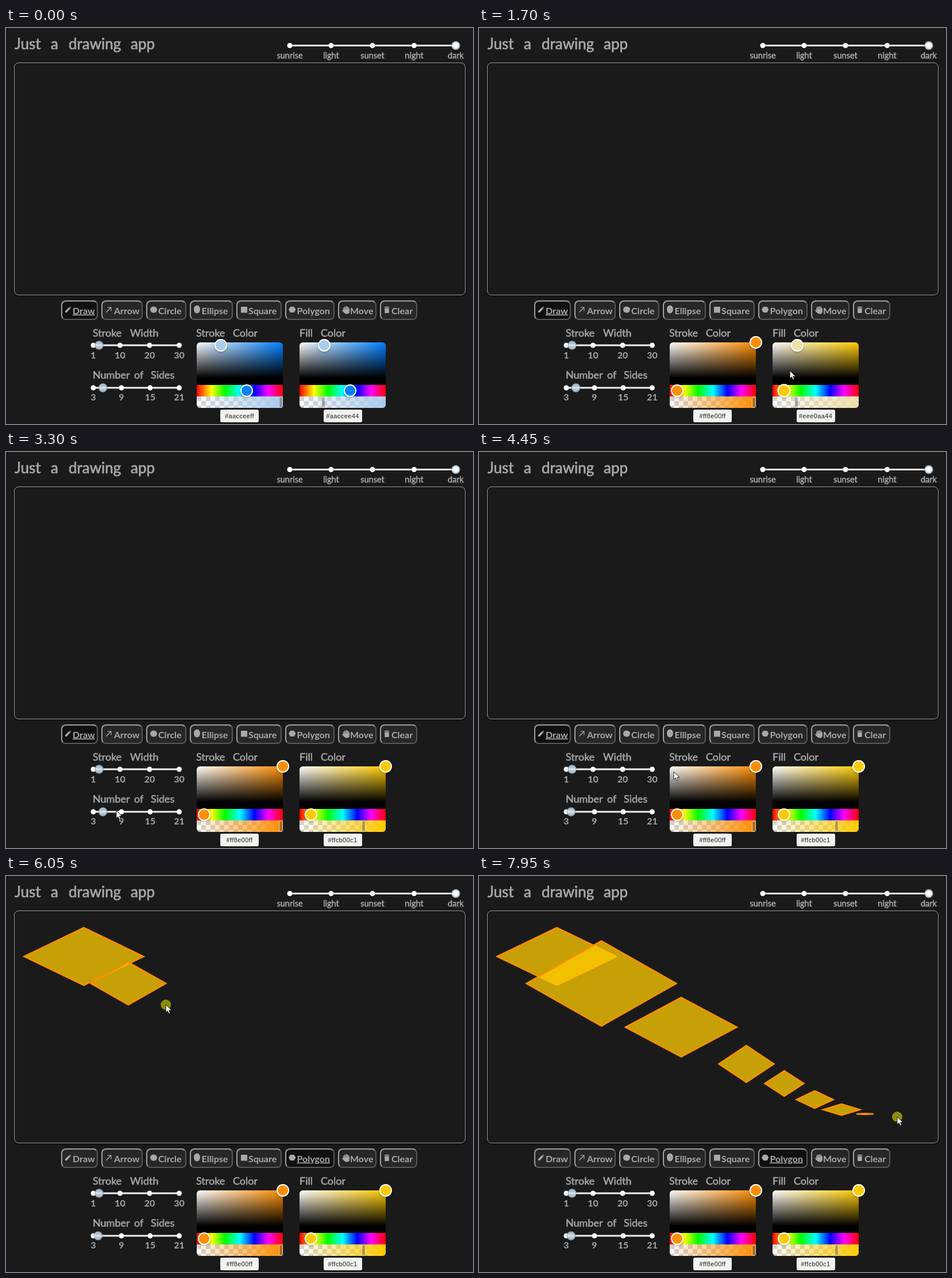
Animation of 813 by 689 pixels, one loop 8000 ms. Source, as an HTML page:

```html
<!DOCTYPE html>
<html lang="en">
<head>
<meta charset="utf-8">
<title>Just a drawing app</title>
<style>
  html, body { margin: 0; width: 100%; height: 100%; overflow: hidden; background: #1a1a1a; }
  #stage { position: relative; width: 813px; height: 689px; overflow: hidden; }
  #stage div, svg { position: absolute; box-sizing: border-box; }
  svg { left: 0; top: 0; width: 813px; height: 689px; }
  text { font-family: Lato, "Open Sans", sans-serif; fill: #a8a8a8; stroke: #a8a8a8; stroke-width: .5px; }
  .title { font-size: 26px; stroke-width: .7px; }
  .head { font-size: 18px; }
  .num, .btn { font-size: 16px; font-weight: bold; stroke-width: 0; }
  .theme { font-size: 14.5px; }
  .paper { left: 14px; top: 60px; width: 786px; height: 405px; border: 1px solid #999;
    border-radius: 8px; box-shadow: 0 1px 4px #0009; }
  .tool { top: 474px; height: 34px; border: 2px solid; border-color: #a0a0a0 #585858 #585858 #a0a0a0;
    border-radius: 8px; background: #272727; }
  .tool.on { background: #101010; }
  .picker { top: 547px; width: 150px; height: 114px; }
  .sat { width: 150px; height: 74px; border-bottom: 12px solid #000; border-radius: 6px 6px 0 0;
    background-image: linear-gradient(0deg, #000, transparent), linear-gradient(90deg, #fff, transparent); }
  .hue { top: 74px; width: 150px; height: 20px;
    background: linear-gradient(90deg, #f00, #ff0 17%, #0f0 33%, #0ff 50%, #00f 67%, #f0f 83%, #f00); }
  .alpha { top: 94px; width: 150px; height: 20px; border-radius: 0 0 6px 6px; overflow: hidden;
    background: repeating-conic-gradient(#fff 0 25%, #d4d4d4 0 50%) 0 0 / 16px 16px; }
  .fade { width: 150px; height: 20px; }
  .dot { width: 22px; height: 22px; margin: -11px; border: 2px solid #fff; border-radius: 50%;
    box-shadow: 0 2px 4px #0003; }
  .grip { top: 94px; width: 7px; height: 20px; margin-left: -3.5px; border: 1.5px solid #ffffffc0;
    border-radius: 3px; background: #0004; box-shadow: 0 0 1px #0009; }
  .hex { left: 41.5px; top: 117px; width: 67px; height: 22px; border-radius: 3px; background: #f2f2f0;
    color: #222; font: 11px/22px "Liberation Sans", Arial, sans-serif; letter-spacing: .4px; text-align: center; }
</style>
</head>
<body>
<div id="stage">
  <div class="paper"></div>
  <div id="tools"></div>
  <svg id="ui"></svg>
  <div id="pickers"></div>
  <svg id="top">
    <g id="shapes" fill="#ffcb00c1" stroke="#ff8e00" stroke-width="2.5" stroke-miterlimit="10"></g>
    <circle id="press" r="9" fill="#ff0" fill-opacity=".5"/>
    <path id="arrow" d="M0 0V13.5L3.2 10.6L5.3 15.4L7.6 14.4L5.5 9.8H10Z" fill="#fff" stroke="#111" stroke-width=".9"/>
    <path id="beam" d="M-3 -6.5Q0 -6.5 0 -5Q0 -6.5 3 -6.5M0 -5V5M-3 6.5Q0 6.5 0 5Q0 6.5 3 6.5" fill="none" stroke="#ddd"/>
  </svg>
</div>
<script>
const $ = id => document.getElementById(id);
const NS = 'http://www.w3.org/2000/svg';
const clamp = v => Math.min(1, Math.max(0, v));

function svg(parent, tag, attrs, label) {
  const el = document.createElementNS(NS, tag);
  for (const k in attrs) el.setAttribute(k, attrs[k]);
  if (label) el.textContent = label;
  return parent.appendChild(el);
}
function div(parent, cls) {
  const el = document.createElement('div');
  el.className = cls;
  return parent.appendChild(el);
}
const ui = $('ui');
const write = (cls, y, anchor, pairs) => pairs.forEach(([x, s]) =>
  svg(ui, 'text', { x, y, class: cls, 'text-anchor': anchor }, s));

// Labels
write('title', 37, 'start', [[15, 'Just'], [78, 'a'], [109, 'drawing'], [217, 'app']]);
write('head', 537, 'start', [[151, 'Stroke'], [216, 'Width'], [331, 'Stroke'], [395, 'Color'], [511, 'Fill'], [548, 'Color']]);
write('head', 610, 'start', [[151, 'Number'], [223, 'of'], [252, 'Sides']]);

// Sliders
function slider(y, stops, r, thumb) {
  svg(ui, 'path', { d: `M${stops[0]} ${y}H${stops[stops.length - 1]}`, stroke: '#efeeee', 'stroke-width': 3 });
  stops.forEach(cx => svg(ui, 'circle', { cx, cy: y, r, fill: '#fff' }));
  return svg(ui, 'circle', { cx: thumb, cy: y, r: 7, fill: '#d5dfe9', 'fill-opacity': .85, stroke: '#86a3bd', 'stroke-width': 1.3 });
}
const themes = [494, 566, 638, 710.5, 783], widths = [152, 198.5, 250, 301.5], counts = [152, 201, 251, 301.5];
slider(30.5, themes, 4.5, 783).setAttribute('fill', '#fff');
slider(552, widths, 4.5, 162);
const sides = slider(626, counts, 4.5, 168.5);
write('theme', 53, 'middle', ['sunrise', 'light', 'sunset', 'night', 'dark'].map((s, i) => [themes[i], s]));
write('num', 575, 'middle', [1, 10, 20, 30].map((s, i) => [widths[i], s]));
write('num', 648, 'middle', [3, 9, 15, 21].map((s, i) => [counts[i], s]));

// Tool buttons: left, right, text x, label, icon path
const pencil = 'M103 495V492.5L109.5 486L112 488.5L105.5 495ZM110.3 485.3L111.2 484.5L113.5 486.8L112.7 487.7Z';
const hand = 'M587 490V486.5H588.8V490H589.3V485H591.2V489.5H591.7V484H593.6V489.5H594.1V485H596V490H596.4V487H598V493Q597.5 497.5 593.5 497.5Q590 497.5 588.5 495.5L584.8 491.5Q585.5 490 587.5 491.5Z';
const tools = [
  [96, 160, 116, 'Draw', pencil],
  [166, 238, 188, 'Arrow', 'M174 494.2L181.4 486.8H177V485.6H183.6V492.2H182.4V487.8L174.9 495.2Z'],
  [244, 314, 265, 'Circle', 'M251 490A6 5.5 0 0 1 263 490A6 5.5 0 0 1 251 490Z'],
  [320, 395, 340.5, 'Ellipse', 'M327 489.5A5.5 7 0 0 1 338 489.5A5.5 7 0 0 1 327 489.5Z'],
  [401, 480, 422, 'Square', 'M409 485H420V495.5H409Z'],
  [486, 572, 506.5, 'Polygon', 'M492 490L495 485H501.5L504.5 490L501.5 495H495Z'],
  [578, 645, 599, 'Move', hand],
  [651, 716, 671, 'Clear', 'M658.5 485.2H661L661.6 484.5H664.4L665 485.2H667.5V486.6H658.5ZM659.2 487.4H666.8V495Q666.8 496 665.8 496H660.2Q659.2 496 659.2 495Z']
].map(([l, r, x, label, d]) => {
  const box = div($('tools'), 'tool');
  box.style.left = l + 'px';
  box.style.width = r - l + 'px';
  svg(ui, 'path', { d, fill: '#a8a8a8' });
  return { box, text: svg(ui, 'text', { x, y: 497.5, class: 'btn' }, label) };
});

// Colour pickers
function picker(left, alpha) {
  const root = div($('pickers'), 'picker'), p = { left, alpha };
  root.style.left = left + 'px';
  p.sat = div(root, 'sat');
  div(root, 'hue');
  p.fade = div(div(root, 'alpha'), 'fade');
  p.grip = div(root, 'grip');
  p.hueDot = div(root, 'dot');
  p.hueDot.style.top = '84px';
  p.satDot = div(root, 'dot');
  p.hex = div(root, 'hex');
  return p;
}
const line = picker(331.5, 1), fill = picker(511, 68 / 255);

function rgb(h, s, v) {
  return [5, 3, 1].map(n => {
    const k = (n + h * 6) % 6;
    return Math.round(255 * v * (1 - s * clamp(Math.min(k, 4 - k))));
  });
}
const hex2 = n => n.toString(16).padStart(2, '0');

function paint(p, c, focus) {
  const col = rgb(c.h, c.s, c.v), pure = `rgb(${rgb(c.h, 1, 1)})`;
  p.sat.style.backgroundColor = p.hueDot.style.backgroundColor = pure;
  p.satDot.style.backgroundColor = `rgb(${col})`;
  p.satDot.style.left = c.s * 150 + 'px';
  p.satDot.style.top = (1 - c.v) * 74 + 'px';
  p.hueDot.style.left = c.h * 150 + 'px';
  p.grip.style.left = 3.5 + c.a * 143 + 'px';
  p.fade.style.background = `linear-gradient(90deg, rgba(${col},0), rgb(${col}))`;
  p.satDot.style.transform = focus === 'sat' ? 'scale(1.06)' : '';
  p.hueDot.style.transform = focus === 'hue' ? 'scale(1.06)' : '';
  p.hex.textContent = '#' + [...col, Math.round(c.a * 255)].map(hex2).join('');
}

// Pointer path: time, x, y
const path = [
  [0, 428, 702], [200, 419, 631], [420, 345.42, 631], [560, 375, 553], [740, 484, 545], [950, 516, 530],
  [1150, 598, 631], [1450, 530.9, 631], [1620, 530.9, 631], [1800, 554, 553], [2000, 672, 545],
  [2250, 580, 633], [2450, 551, 651], [2500, 551, 651], [2750, 624.53, 651], [2850, 622, 651],
  [3300, 192, 624], [3450, 169, 620], [3600, 169, 620], [4000, 160, 619], [4120, 160, 619],
  [4800, 529, 490], [4950, 529, 488], [5350, 135.5, 140], [5400, 135.5, 140], [5450, 148.5, 151],
  [5700, 239.5, 190], [5780, 239.5, 190], [5900, 213, 187], [6200, 343.5, 261], [6300, 352, 263],
  [6550, 449, 314.5], [6650, 465.5, 327], [6700, 473, 331.3], [6850, 513.5, 359], [6950, 531.5, 361],
  [7050, 565.5, 383], [7150, 584.5, 389], [7250, 616.5, 404], [7350, 631, 406.5], [7450, 663, 416.2],
  [7500, 663, 416.2], [7600, 672, 414], [7700, 687, 414.7], [7900, 728, 419], [8000, 728, 419]
];
function at(t) {
  let i = 1;
  while (path[i][0] < t) i++;
  const [t0, x0, y0] = path[i - 1], [t1, x1, y1] = path[i], k = (t - t0) / (t1 - t0);
  return [x0 + (x1 - x0) * k, y0 + (y1 - y0) * k];
}

// Presses: start, end, kind, picker
const presses = [
  [200, 420, 'hue', line], [560, 740, 'sat', line],
  [1150, 1450, 'hue', fill], [1800, 2000, 'sat', fill], [2500, 2750, 'alpha', fill],
  [3600, 3950, 'sides'], [4800, 4850, 'tool'],
  ...[[5400, 5700], [5900, 6200], [6300, 6550], [6650, 6850], [6950, 7050], [7150, 7250], [7350, 7450], [7600, 7700]]
    .map(([a, b]) => [a, b, 'shape']),
  [7900, 8000, 'none']
];
const diamonds = presses.filter(p => p[2] === 'shape').map(p => [p, svg($('shapes'), 'path', {})]);

function draw(t) {
  const start = a => ({ h: 210 / 360, s: 68 / 238, v: 238 / 255, a });
  const colors = new Map([[line, start(line.alpha)], [fill, start(fill.alpha)]]);
  let focus = [], n = 5, polygon = false, down = false;
  for (const [from, to, kind, who] of presses) {
    if (t < from) break;
    const [x, y] = at(Math.min(t, to)), c = colors.get(who);
    const u = c && clamp((x - who.left) / 150);
    if (kind === 'hue') c.h = u;
    if (kind === 'sat') { c.s = u; c.v = clamp(1 - (y - 547) / 74); }
    if (kind === 'alpha') c.a = u;
    if (kind === 'sides') n = 3 + Math.round((x - 152) / 150 * 18);
    if (kind === 'tool') polygon = true;
    focus = [who, kind];
    down = t <= to;
  }
  for (const [p, c] of colors) paint(p, c, focus[0] === p && focus[1]);
  sides.setAttribute('cx', 152 + (n - 3) / 18 * 150);
  tools.forEach((tool, i) => {
    const on = i === (polygon ? 5 : 0);
    tool.box.classList.toggle('on', on);
    tool.text.style.textDecoration = on ? 'underline' : 'none';
  });
  for (const [[from, to], el] of diamonds) {
    const [cx, cy] = at(from), [x, y] = at(Math.max(from, Math.min(t, to)));
    const rx = x - cx, ry = y - cy;
    el.setAttribute('d', t > from ? `M${cx + rx} ${cy}L${cx} ${cy + ry}L${cx - rx} ${cy}L${cx} ${cy - ry}Z` : '');
  }
  const [x, y] = at(t), overText = x > 511 && x < 590 && y > 522 && y < 540 && t < 1100;
  for (const id of ['press', 'arrow', 'beam']) $(id).setAttribute('transform', `translate(${x} ${y})`);
  $('press').style.display = down ? '' : 'none';
  $('arrow').style.display = overText ? 'none' : '';
  $('beam').style.display = overText ? '' : 'none';
}

const begin = performance.now();
function tick() {
  const t = (performance.now() - begin) % 8000;
  draw(Math.floor(t / 50) * 50);
  requestAnimationFrame(tick);
}
tick();
</script>
</body>
</html>
```
